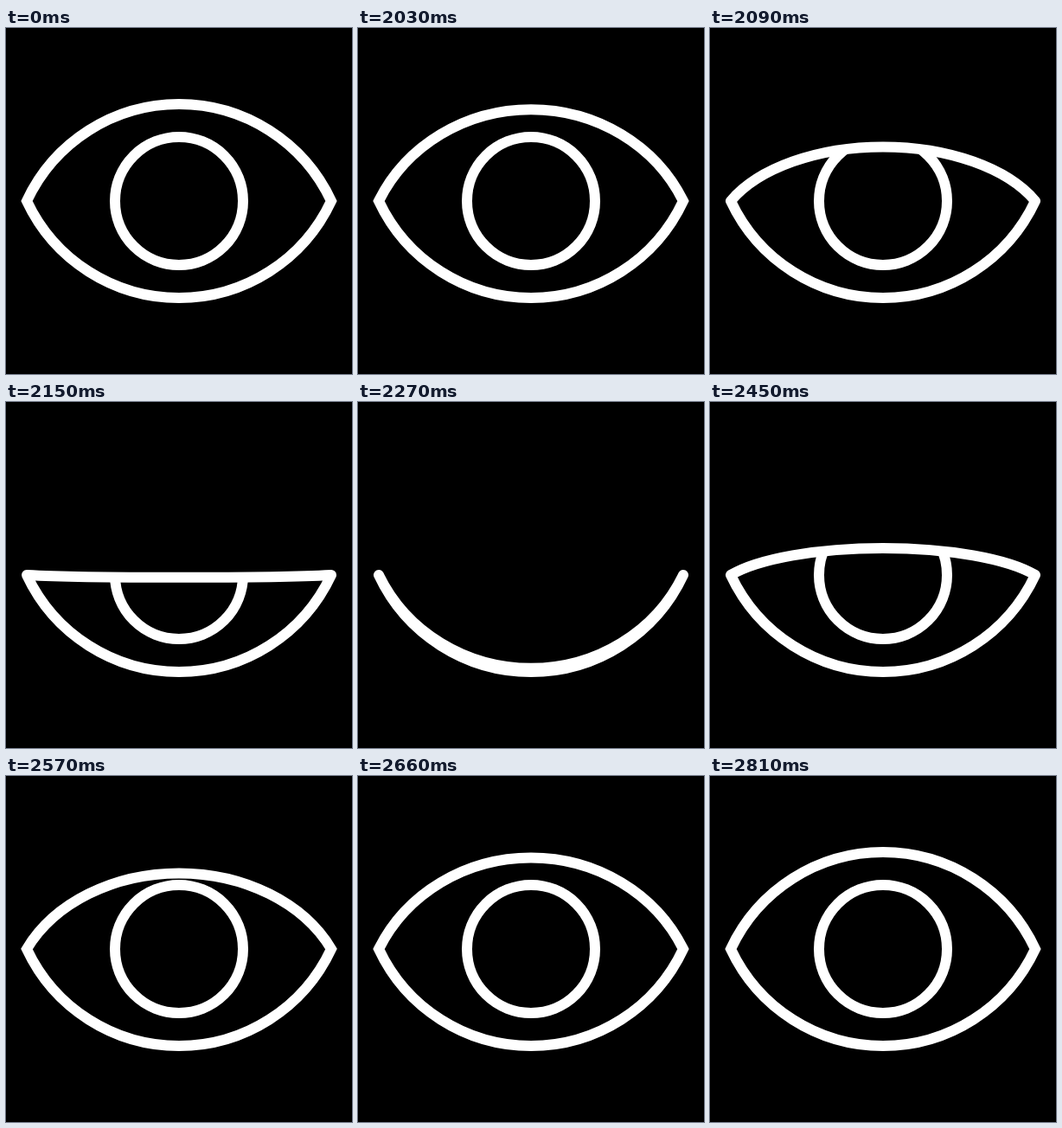
Animation, 400 px wide and 400 px high, one loop 2.84 s. Source, as an HTML page:

```html
<!DOCTYPE html>
<html lang="en">
<head>
<meta charset="utf-8">
<title>Blinking eye</title>
<style>
  html, body { margin: 0; width: 100%; height: 100%; overflow: hidden; background: #000; }
  svg { display: block; width: 100%; height: 100%; }
</style>
</head>
<body>
<svg viewBox="0 0 400 400" fill="none" stroke="#fff" stroke-width="12">
  <clipPath id="below-lid"><path id="opening"/></clipPath>
  <circle cx="200" cy="200" r="74" clip-path="url(#below-lid)"/>
  <path id="outline"/>
</svg>
<script>
const LOOP = 2840, STEP = 30, BLINK = 2030;
const CLOSE = { start: 2001, length: 293 };
const OPEN = { start: 2305, length: 525 };
const LEFT = 24, RIGHT = 376, MIDDLE = 200, HEIGHT = 112;
const HALF = (RIGHT - LEFT) / 2;
const RADIUS = (HALF * HALF + HEIGHT * HEIGHT) / (2 * HEIGHT);

const outline = document.getElementById('outline');
const opening = document.getElementById('opening');

const progress = (t, { start, length }) => Math.min(1, Math.max(0, (t - start) / length));
const easeInOut = x => x * x * (3 - 2 * x);
const easeOut = x => 1 - (1 - x) ** 3.15;

// Lid position: 1 is fully open, -1 lies on the lower lid.
function lidAt(t) {
  if (t < BLINK) return 1;
  return 1 - 2 * easeInOut(progress(t, CLOSE)) + 2 * easeOut(progress(t, OPEN));
}

function draw(t) {
  const lid = lidAt(t);
  const upper = `M${LEFT} ${MIDDLE}A${RADIUS} ${RADIUS * Math.abs(lid)} 0 0 ${lid > 0 ? 1 : 0} ${RIGHT} ${MIDDLE}`;
  outline.setAttribute('d', `${upper}A${RADIUS} ${RADIUS} 0 0 1 ${LEFT} ${MIDDLE}Z`);
  outline.setAttribute('stroke-linejoin', lid > 0.72 ? 'miter' : 'round');
  opening.setAttribute('d', `${upper}V400H${LEFT}Z`);
}

const begin = performance.now();

function tick() {
  const t = (performance.now() - begin) % LOOP;
  draw(t < BLINK ? 0 : BLINK + Math.floor((t - BLINK) / STEP) * STEP);
  requestAnimationFrame(tick);
}
tick();
</script>
</body>
</html>
```
